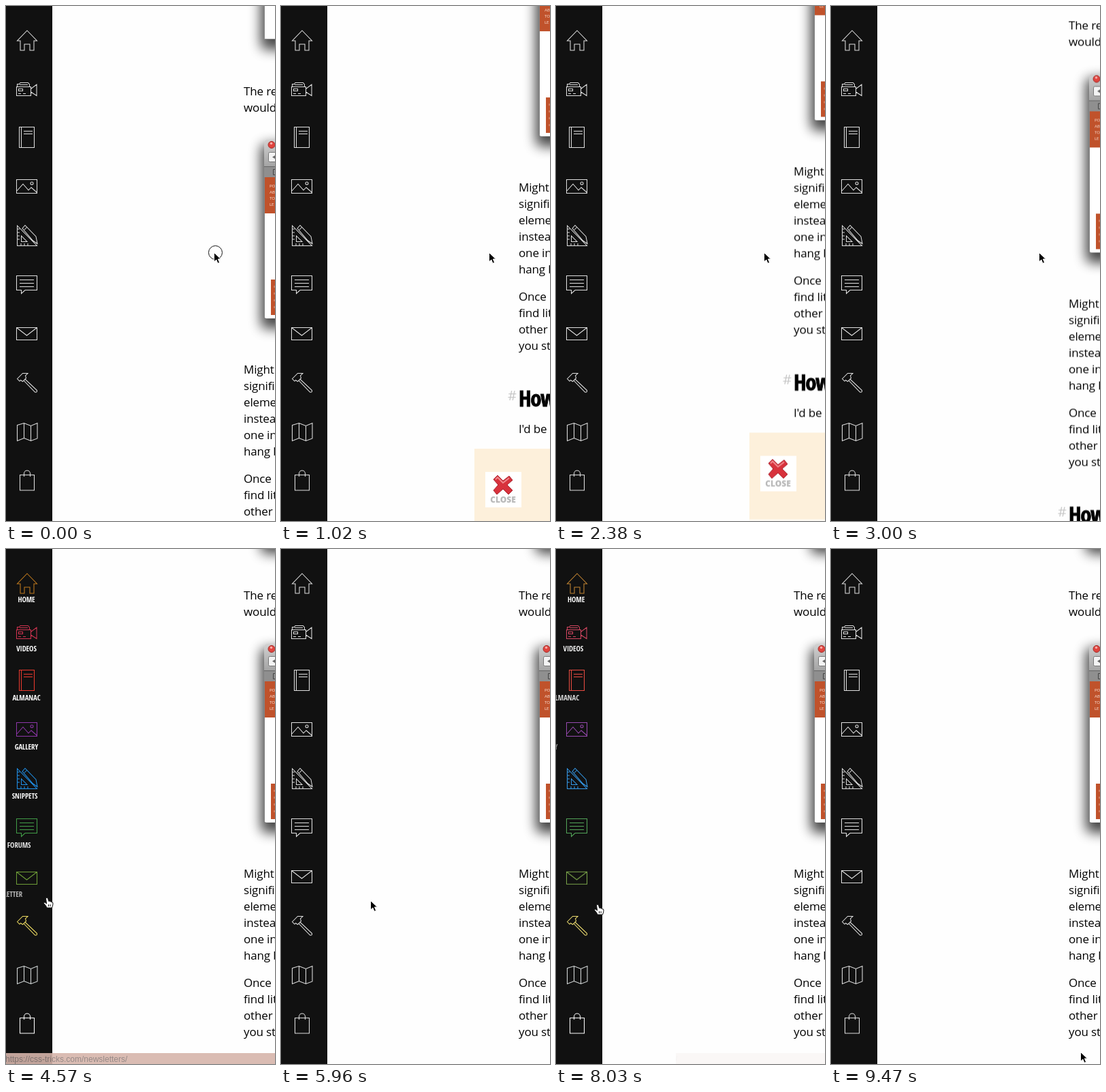
Recreate the animation shown at these times as an HTML page. Size 395 by 755 pixels, loop 9.83 s.

```html
<!DOCTYPE html>
<html lang="en">
<head>
<meta charset="utf-8">
<title>Sidebar hover</title>
<style>
html, body { margin: 0; width: 100%; height: 100%; overflow: hidden; background: #fefefe; }
svg { display: block; width: 395px; height: 755px; }
#page, #cursor, #ring, #hand, #arrow, #status, .icon, .label { animation: 9830ms linear infinite; }

.body { font: 17px "Open Sans", "Noto Sans", sans-serif; letter-spacing: -.15px; fill: #000; }
.title { font: 800 33px "Open Sans Condensed", "Open Sans", sans-serif; font-stretch: 75%; letter-spacing: -1.5px; stroke: #000; stroke-width: .8px; }
.hash { font: 20px "Open Sans", sans-serif; fill: #c6c6c6; }
.nav { font: 6px Lato, sans-serif; fill: #f6d9cc; }
.tile { font: 800 12px "Open Sans", sans-serif; fill: #b9b9b9; text-anchor: middle; }
.url { font: 12px "Liberation Sans", Arial, sans-serif; fill: #8b7d7a; }
.shadow { filter: blur(9px); opacity: .72; }

#page { animation-name: scroll; }
@keyframes scroll {
  0% { transform: translateY(0); }
  4.476% { transform: translateY(0); animation-timing-function: cubic-bezier(.3, .5, .4, 1); }
  14.446%, 15.056% { transform: translateY(-300px); animation-timing-function: cubic-bezier(.215, .61, .355, 1); }
  20.855%, 22.381% { transform: translateY(-390px); animation-timing-function: cubic-bezier(.23, .54, .4, .97); }
  36.521%, 100% { transform: translateY(-57px); }
}

.icon { fill: none; stroke: #dedede; stroke-width: 1.05; animation-name: tint; }
@keyframes tint {
  0%, 44.252%, 55.29%, 65.412%, 75.534%, 80.478%, 87.03%, 100% { stroke: #dedede; transform: none; }
  45.626%, 53.917%, 66.785%, 74.161%, 81.851%, 85.656% { stroke: var(--tint); transform: translateY(var(--drop)); }
}

.label {
  font: 800 10.8px "Open Sans Condensed", "Open Sans", sans-serif; font-stretch: 75%;
  letter-spacing: -.1px; text-anchor: middle; fill: #fff; opacity: 0;
  animation-name: slide; animation-timing-function: cubic-bezier(.215, .61, .355, 1);
}
@keyframes slide {
  0%, 44.252%, 55.29%, 65.412%, 75.534%, 80.478%, 87.03%, 100% { opacity: 0; transform: translateX(-100px); }
  45.626%, 53.917%, 66.785%, 74.161%, 81.851%, 85.656% { opacity: 1; transform: none; }
}

#status { animation-name: status; }
@keyframes status {
  0%, 45.371%, 55.443%, 66.531%, 75.687%, 81.597%, 87.182%, 100% { opacity: 0; clip-path: inset(0 0 0 196px); }
  46.44%, 53.917%, 67.599%, 74.161%, 82.665%, 85.656% { opacity: .9; clip-path: inset(0 0 0 0px); }
}

#cursor { animation-name: move; animation-timing-function: ease-in-out; }
@keyframes move {
  0%, 32.96% { transform: translate(305px, 361px); }
  36.521%, 39.573% { transform: translate(156px, 500px); }
  45.575%, 52.798% { transform: translate(60px, 511px); }
  57.986%, 62.97% { transform: translate(131px, 515px); }
  66.124%, 72.94% { transform: translate(60px, 517px); }
  76.297%, 78.332% { transform: translate(140px, 520px); }
  81.689%, 84.435% { transform: translate(61px, 521px); }
  89.522%, 93.896% { transform: translate(188px, 524px); }
  96.338%, 100% { transform: translate(366px, 737px); }
}
#hand { animation-name: point; animation-timing-function: step-end; }
#arrow { animation-name: rest; animation-timing-function: step-end; }
@keyframes point {
  0%, 53.917%, 74.161%, 85.656%, 100% { opacity: 0; }
  44.252%, 65.412%, 80.478% { opacity: 1; }
}
@keyframes rest {
  0%, 53.917%, 74.161%, 85.656%, 100% { opacity: 1; }
  44.252%, 65.412%, 80.478% { opacity: 0; }
}
#ring { animation-name: click; animation-timing-function: step-end; }
@keyframes click {
  0% { opacity: 1; }
  .509%, 100% { opacity: 0; }
}
</style>
</head>
<body>
<svg viewBox="0 0 395 755">
  <defs>
    <linearGradient id="chrome" x2="0" y2="1">
      <stop stop-color="#d2d2d2"/><stop offset="1" stop-color="#a3a3a3"/>
    </linearGradient>
  </defs>

  <g id="page">
    <rect class="shadow" x="374" y="-200" width="400" height="264" rx="8"/>
    <path fill="#fff" stroke="#8c8c8c" d="M379.500 -200V48.500H800"/>

    <rect class="shadow" x="374" y="202" width="400" height="271" rx="8"/>
    <rect x="379" y="196" width="400" height="262" rx="4" fill="#fff"/>
    <path fill="url(#chrome)" d="M379 236V200Q379 196 383 196H800V236Z"/>
    <path fill="#8f8f8f" d="M379 236H800V251H379Z"/>
    <path stroke="#666" d="M379 235.500H800"/>
    <circle cx="390" cy="203.500" r="5" fill="#e0443e" stroke="#a3302c"/>
    <circle cx="389.500" cy="201.500" r="1.800" fill="#f6aaa6"/>
    <rect x="385.500" y="214.500" width="40" height="14" rx="2" fill="#f3f3f3" stroke="#777"/>
    <path fill="#666" d="M391 221.500L395 219V224Z"/>
    <path fill="none" stroke="#444" d="M396 239.500H392.500V247.500H396"/>
    <path fill="#c0522b" d="M379 251H800V304H379ZM389 401H800V453H389Z"/>
    <path stroke="#e3a088" d="M394 410V413M394 420V423M394 430V433M394 440V443"/>
    <path stroke="#858585" d="M379.500 251V457"/>
    <g id="nav" class="nav"></g>

    <g id="copy" class="body"></g>
    <text class="hash" x="333" y="845">#</text>
    <text class="title" x="349" y="854">How</text>

    <path fill="#fdf0db" d="M284 916H395V1043H284Z"/>
    <path fill="#fdfaf3" d="M284 1043H395V1170H284Z"/>
    <path fill="#fff" d="M300 950H353V1002H300ZM300 1067H353V1122H300Z"/>
    <path fill="#d8323c" stroke="#a91f2b" stroke-linejoin="round" d="M312 961L318 955L326 963L335 956L340 962L332 969L340 977L334 983L326 975L317 983L312 977L319 969Z"/>
    <path fill="none" stroke="#f08a8e" stroke-width="2" d="M315 961L318 958L326 966L335 959"/>
    <text class="tile" x="326" y="995">CLOSE</text>
    <path fill="#f3e9d8" stroke="#b9a78c" d="M318 1079H334V1091H318Z"/>
    <path fill="none" stroke="#5a3524" stroke-width="3" d="M314 1081L326 1070L338 1081"/>
    <path fill="#c4632e" d="M323 1082H329V1091H323Z"/>
    <path fill="#7a3b25" d="M332 1070H335V1076H332Z"/>
    <text class="tile" x="326" y="1105">BACK</text>
    <text class="tile" x="326" y="1117">HOME</text>
  </g>

  <rect width="68" height="755" fill="#111"/>
  <g id="menu"></g>

  <g id="status">
    <rect y="739" width="395" height="16" fill="#d6b5ab"/>
    <text class="url" x="-1" y="752">https://css-tricks.com/newsletters/</text>
  </g>

  <circle id="ring" cx="307.500" cy="361.500" r="10" fill="none" stroke="#111"/>
  <g id="cursor">
    <path id="arrow" stroke="#fff" d="M.5 .5V14L3.800 11L6 16.300L8.600 15.200L6.400 10H10.500Z"/>
    <path id="hand" fill="#fff" stroke="#111" d="M-1.500 1Q0 -1 1.500 1L2.700 5.500Q4 4 5 6Q6.500 5 7.200 7Q9 6 9 9L8.500 12L7.500 15H0L-1.500 12L-4.500 8.500Q-4.500 6.500 -2.500 7.200L-.5 9ZM2.500 10V13M5 10V13"/>
  </g>
</svg>

<script>
const SVG = "http://www.w3.org/2000/svg";
const byId = id => document.getElementById(id);

function add(parent, tag, attrs, text = "") {
  const el = document.createElementNS(SVG, tag);
  for (const key in attrs) el.setAttribute(key, attrs[key]);
  el.textContent = text;
  parent.append(el);
  return el;
}

function lines(parent, x, y, step, words) {
  words.forEach((word, i) => add(parent, "text", { x, y: y + i * step }, word));
}

const copy = byId("copy");
lines(copy, 349, 131, 24, ["The rest", "would"]);
lines(copy, 349, 539, 24, ["Might", "signific", "element", "instead", "one in", "hang b"]);
lines(copy, 349, 699, 24, ["Once", "find little", "other", "you start"]);
lines(copy, 349, 893, 24, ["I'd be"]);
lines(byId("nav"), 387, 265.500, 9.200, ["PO", "AB", "TO", "LE"]);

const items = [
  ["HOME", "#c07a1e", "M31 36L45.500 51H41V65H35V56H27V65H21V51H16.500Z"],
  ["VIDEOS", "#cf3350", "M15.500 118.500H36.500V131.500H15.500ZM16.500 118V114.500H19.500L21 112.500H32.500L34.500 115V118M20 115.500H32M18.500 121.500H24.500V124.500H18.500ZM18 128.500H22M25 128.500H29M36.500 121.500L45 115V131.500L36.500 126"],
  ["ALMANAC", "#e8392d", "M19.500 177.500H41.500V207.500H19.500ZM22.500 178V207M26 183.500H39M26 187.500H39"],
  ["GALLERY", "#8d36a8", "M15.500 254.500H45.500V274.500H15.500ZM16 271L25 261L33 270L37 266L45 273M36 260a2 2 0 1 0 4 0a2 2 0 1 0 -4 0"],
  ["SNIPPETS", "#2091ea", "M16.500 322V351.500H45.500ZM22.500 337V345.500H31ZM17 327H20M17 332H20M17 337H20M17 342H20M22 351V348M27 351V348M32 351V348M24 326L28 321.500L44 338L46 348.500L39.500 344ZM27 328L31 324"],
  ["FORUMS", "#419c47", "M15.500 395.500H45.500V416.500H28L22.500 421.500V416.500H15.500ZM20 401.500H41M20 406.500H41M20 411.500H41"],
  ["NEWSLETTER", "#6d9c37", "M15.500 471.500H45.500V489.500H15.500ZL30.500 483L45.500 471.500"],
  ["JOBS", "#f0dd62", "M16.500 546.500L24.500 538.500L32 538.500L28.500 542L29.500 545.500L24.500 550.500L21.500 548.500L20 550ZM26 549L28 547L45.500 563.500Q46 567 42.500 566Z"],
  ["GUIDES", "#d5dada", "M16.500 614.500L26.500 611.500L36.500 615.500L46 611.500V634L36.500 637.500L26.500 633.500L16.500 637.500ZM26.500 611.500V633.500M36.500 615.500V637.500"],
  ["SHOP", "#fff", "M20.500 687.500H41.500V710H20.500ZM26.500 690V685.500a4.500 4.500 0 0 1 9 0V690"]
];

items.forEach(([name, tint, d], i) => {
  const drop = name === "NEWSLETTER" ? 2 : 0;
  add(byId("menu"), "path", { class: "icon", d, style: `--tint:${tint};--drop:${drop}px` });
  add(byId("menu"), "text", {
    class: "label", x: 30, y: 77.500 + i * 72, style: `animation-delay:${i * 30}ms`
  }, name);
});
</script>
</body>
</html>
```
